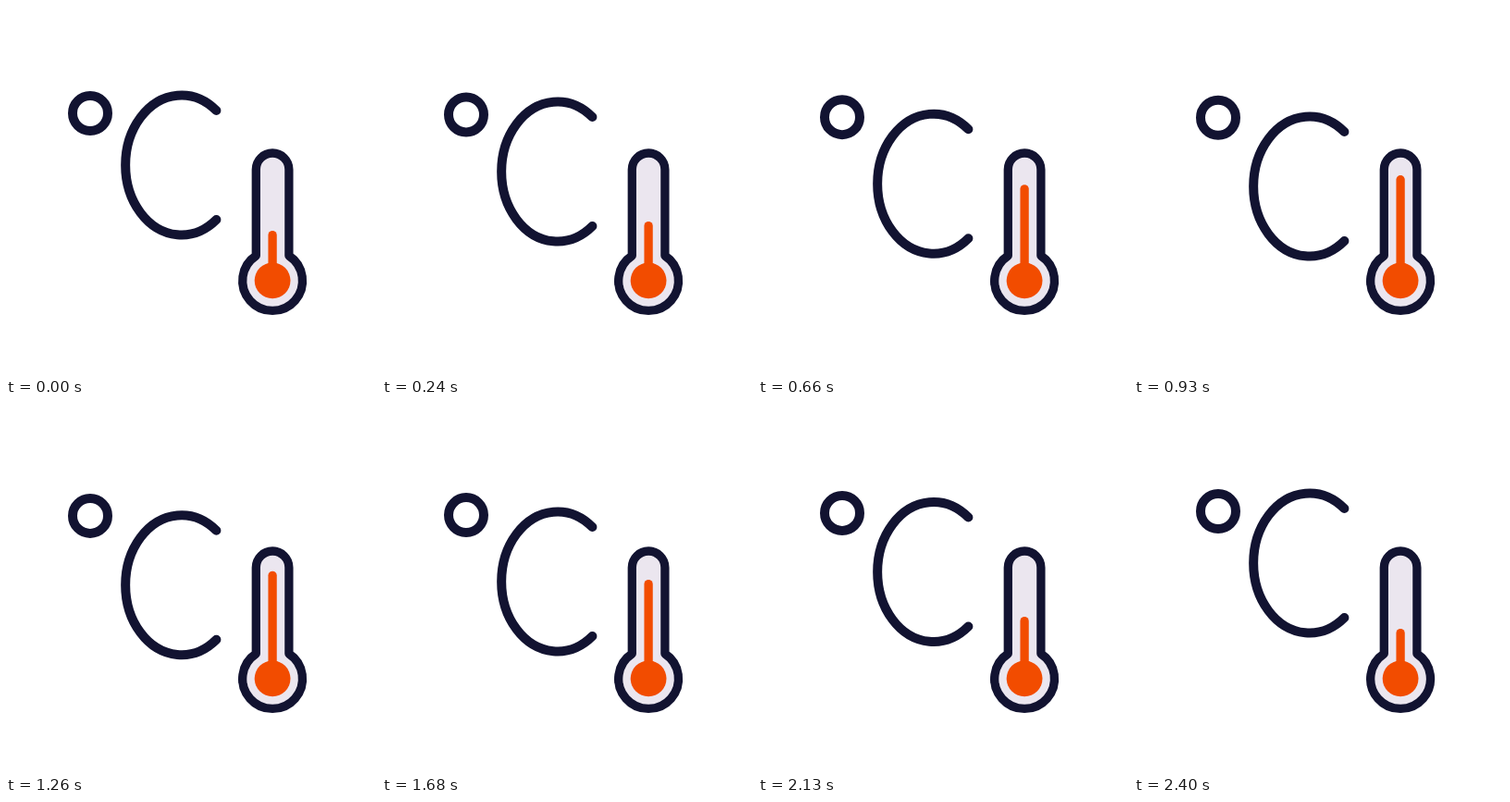
An HTML page that plays this animation: 400 by 400 pixels, repeating every 2430 ms.

```html
<!DOCTYPE html>
<html lang="en">
<head>
<meta charset="utf-8">
<title>Thermometer</title>
<style>
  html, body { margin: 0; height: 100%; overflow: hidden; background: #fff; }
  svg { display: block; width: 100%; height: 100%; }
  path, circle { fill: none; stroke: #121331; stroke-width: 10; stroke-linecap: round; stroke-linejoin: round; }
  #glass { fill: #ebe6ef; stroke-width: 9.3; }
  #mercury { stroke: #f24c00; stroke-width: 9.3; }
  #bulb { fill: #f24c00; stroke: none; }
</style>
</head>
<body>
<svg viewBox="0 0 400 400">
  <circle id="degree" cx="91" cy="116" r="19"/>
  <path id="letter" d="M227.4 113A60.5 75.5 0 1 0 227.4 231"/>
  <path id="glass" d="M270.3 270V176.8a17.8 17.8 0 0 1 35.6 0V270A32.4 32.4 0 1 1 270.3 270Z"/>
  <path id="mercury"/>
  <circle id="bulb" cx="288.1" cy="296.8" r="19.4"/>
</svg>
<script>
const LOOP = 2430, HALF = 1200, FRAME = 30;
const get = id => document.getElementById(id);
const degree = get('degree'), letter = get('letter'), mercury = get('mercury');

// Cubic Bezier easing, solved for x by bisection
function bezier(x1, y1, x2, y2) {
  const at = (a, b, s) => 3 * a * s * (1 - s) ** 2 + 3 * b * s * s * (1 - s) + s ** 3;
  return x => {
    let low = 0, high = 1;
    for (let i = 0; i < 24; i++) {
      const mid = (low + high) / 2;
      if (at(x1, x2, mid) < x) low = mid; else high = mid;
    }
    return at(y1, y2, (low + high) / 2);
  };
}

const rise = bezier(.33, 0, .3, 1);
const drop = bezier(.25, .1, .25, 1);

function draw(now) {
  const time = Math.floor(now % LOOP / FRAME) * FRAME;
  const u = time / HALF;
  const heat = rise(u < 1 ? u : 2 - u);
  const sink = u < 1 ? drop(u) : 1 - (u - 1) ** 2;
  degree.setAttribute('transform', `translate(0 ${4.9 * sink})`);
  letter.setAttribute('transform', `translate(0 ${23.8 * sink})`);
  mercury.setAttribute('d', `M288.1 296V${247.6 - 62.4 * heat}`);
}

const start = performance.now();
function tick() {
  draw(performance.now() - start);
  requestAnimationFrame(tick);
}
tick();
</script>
</body>
</html>
```
